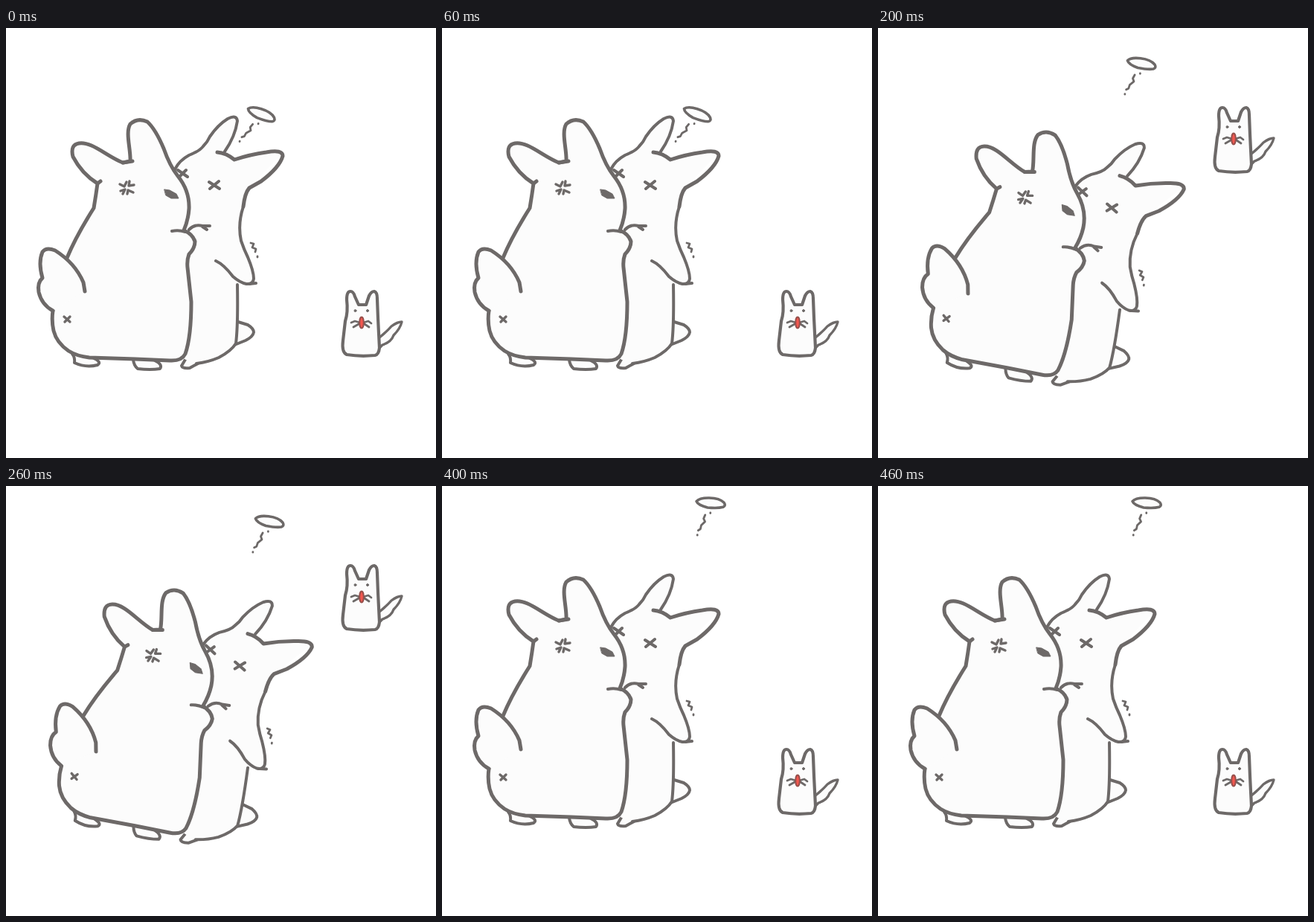
An HTML page for the animation above (500 ms loop, 578x578 px).

```html
<!DOCTYPE html>
<html lang="en">
<head>
<meta charset="utf-8">
<title>Rocking rabbits</title>
<style>
  html, body { margin: 0; width: 100%; height: 100%; overflow: hidden; background: #fff; }
  svg { display: block; width: 100%; height: 100%; }
  path, ellipse { fill: #fcfcfc; stroke: #6d6968; stroke-width: 5; stroke-linecap: round; stroke-linejoin: round; }
  .shape { stroke: none; }
  .line { fill: none; }
  .thin { stroke-width: 4; }
  .mark { fill: none; stroke-width: 4; }
  .fine { fill: none; stroke-width: 2.8; }
  .dark { fill: #6d6968; stroke-width: 1; }
  .tongue { fill: #f4574f; stroke: #97504c; stroke-width: 2; }
</style>
</head>
<body>
<svg viewBox="0 0 578 578">
  <g id="pair">
    <!-- rear rabbit -->
    <path class="thin" d="M312 395L325 399Q333 404 333 409Q332 415 322 420L307 426"/>
    <path class="thin" d="M242 444L236 454Q237 458 247 457L258 451"/>
    <path class="shape" d="M227 189L262 163L300 121L312 125L294 167L307 177L372 168L327 215Q308 255 316 285L311 345L309 425L290 442L252 451L238 444V240Z"/>
    <path class="line thin" d="M227 190Q233 178 246 171Q261 165 265 159Q271 153 274 146Q285 130 298 122Q310 116 311 125Q308 146 294 166"/>
    <path class="line" d="M284 167Q296 168 307 177Q328 170 350 167Q372 163 372 172Q368 187 343 206L327 215Q321 222 319 240"/>
    <path class="line thin" d="M311 345Q312 400 309 424Q303 434 286 443Q272 449 256 451"/>
    <path class="thin" d="M319 240C313 258 313 272 316 286Q320 298 325 308Q333 327 333 337Q332 345 323 344Q314 342 305 334Q293 318 282 313"/>
    <path class="mark" d="M327 344L336 343M273 207L287 216M286 206L274 216M231 191L244 200M242 191L232 201"/>
    <path class="fine" d="M329 289L333 290L331 295L336 297L335 301M338 307V308"/>

    <!-- front rabbit -->
    <path class="thin" d="M89 438Q93 443 92 450Q107 457 123 453Q129 449 118 444"/>
    <path class="thin" d="M171 446Q172 454 177 458Q194 460 207 458Q211 452 200 447"/>
    <path d="M82 309Q94 280 118 242Q121 224 123 209Q102 196 90 173Q86 157 98 155C115 152 136 173 157 181L167 179C168 163 160 141 167 129Q177 120 190 126Q201 136 212 162Q220 185 231 199Q247 219 246 243Q245 258 239 272Q251 277 254 287Q254 296 246 304Q243 312 244 322L249 368Q249 415 241 438Q236 448 220 447L174 445L112 443Q95 441 84 434Q68 423 64 407Q61 394 63 380"/>
    <path d="M63 380Q48 372 44 355Q42 342 49 336Q43 315 49 301Q54 294 66 299Q93 316 104 342L106 354"/>
    <path class="line" d="M123 209L127 206M157 181L170 179"/>
    <path class="mark" d="M223 273Q232 271 241 274M246 271Q254 263 264 266L274 266M264 267L270 271"/>
    <path class="dark" d="M213 217L220 218L229 223L232 229H222L215 225Z"/>
    <path class="line" style="stroke-width:3.4" d="M153 210L159 213L162 207M166 206L165 212L172 211M154 219L160 217L157 223M163 223L164 218L171 221"/>
    <path class="mark" style="stroke-width:3.4" d="M78 388L86 395M86 388L79 395"/>
  </g>

  <g id="pup">
    <path class="thin" style="stroke-width:3.4" d="M502 416Q512 408 518 401Q526 395 532 395Q530 404 521 413Q518 422 506 426L502 430"/>
    <path style="stroke-width:4.2" d="M453 420L456 394Q460 382 458 365Q458 354 463 354Q467 354 469 361L474 372H484L488 360Q491 354 495 354Q499 355 499 364L500 390L502 430Q501 439 496 440Q476 442 458 439Q451 436 453 420Z"/>
    <path class="fine" d="M464 396L469 394L476 396M467 402L474 398M480 396L487 394L491 397M482 398L488 402"/>
    <ellipse class="dark" cx="469.5" cy="380" rx="1.5" ry="1.5"/>
    <ellipse class="dark" cx="486" cy="380" rx="1.5" ry="1.5"/>
    <ellipse class="tongue" cx="478" cy="396" rx="2.8" ry="7.5"/>
  </g>

  <g id="halo">
    <path style="stroke-width:3.6" d="M-19-2Q-15-7-2-7Q12-7 18-1Q21 3 17 5Q10 7-4 6Q-17 3-19-2Z"/>
    <path class="fine" d="M0 13V13.5M-7 16L-9 21L-7 25L-12 30L-13 35L-16 37M-17 43V43.5"/>
  </g>
</svg>
<script>
  const STEP = 100;
  // tilt of the pair, height of the pup's jump, halo [x, y, angle]
  const poses = [
    { tilt: 0, jump: 0, halo: [343, 116, 17] },
    { tilt: -8.7, jump: 67, halo: [325, 75, -2] },
    { tilt: 8.6, jump: 247, halo: [354, 48, 7] },
    { tilt: 2, jump: 34, halo: [368, 27, 17] },
    { tilt: 0, jump: 0, halo: [361, 23, 1] }
  ];
  const place = (id, transform) => document.getElementById(id).setAttribute("transform", transform);

  function draw(time) {
    const { tilt, jump, halo: [x, y, angle] } = poses[Math.floor(time / STEP) % poses.length];
    place("pair", `rotate(${tilt} 94 455)`);
    place("pup", `translate(0 ${-jump})`);
    place("halo", `translate(${x} ${y}) rotate(${angle})`);
  }

  const start = performance.now();
  function tick() {
    draw(performance.now() - start);
    requestAnimationFrame(tick);
  }
  tick();
</script>
</body>
</html>
```
